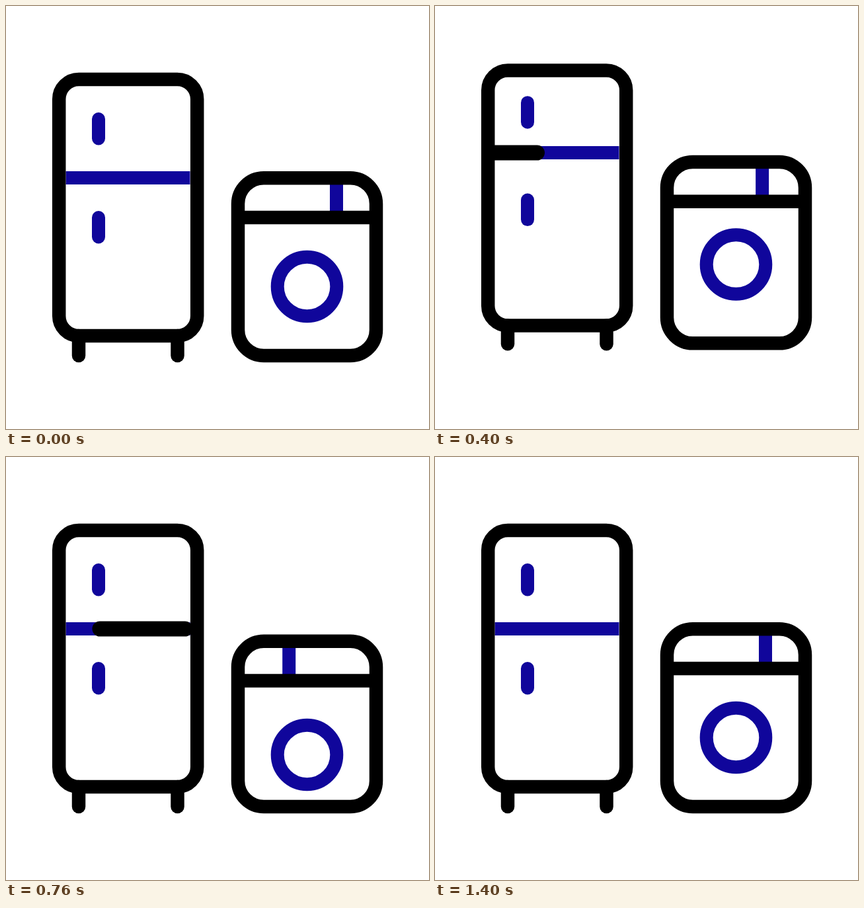
These frames come from a looping animation (640 by 640 pixels, 1.48 s). An HTML page with a canvas:

```html
<!DOCTYPE html>
<html>
<head>
<meta charset="utf-8">
<title>Appliances</title>
<style>
html, body { margin: 0; width: 100%; height: 100%; overflow: hidden; background: #fff; }
canvas { display: block; width: 100vw; height: 100vh; }
</style>
</head>
<body>
<canvas id="stage" width="640" height="640"></canvas>
<script>
const ctx = document.getElementById('stage').getContext('2d');
const LOOP = 1480, STEP = 40;
const BLACK = '#000', BLUE = '#10069b';
const RISE = 190, FALL = 285, SETTLE = 155;

// Smooth progress from 0 to 1 between two times.
function ease(t, from, to) {
  const s = Math.min(1, Math.max(0, (t - from) / (to - from)));
  return s * s * (3 - 2 * s);
}

// A hop: every part rises by lift, lands squash below its place, then settles.
function hop(t, start) {
  const apex = start + RISE, landing = apex + FALL;
  const up = ease(t, start, apex);
  const down = ease(t, apex, landing);
  const settled = ease(t, landing, landing + SETTLE);
  return (lift, squash = 0) => squash * (down - settled) - lift * (up - down);
}

function line(x0, y0, x1, y1, color, cap = 'butt', width = 20) {
  ctx.strokeStyle = color;
  ctx.lineCap = cap;
  ctx.lineWidth = width;
  ctx.beginPath();
  ctx.moveTo(x0, y0);
  ctx.lineTo(x1, y1);
  ctx.stroke();
}

function frame(left, top, right, bottom, radius) {
  ctx.strokeStyle = BLACK;
  ctx.lineWidth = 20.5;
  ctx.beginPath();
  ctx.roundRect(left, top, right - left, bottom - top, radius);
  ctx.stroke();
}

function handle(y) {
  line(140, y, 140, y + 29.5, BLUE, 'round');
}

function drawFridge(t) {
  const move = hop(t, 95);
  const top = 111 + move(39.5, 33);
  const shelf = 260 + move(66, 12.5);
  const bottom = 499 + move(28, 7.2);
  const foot = 529 + move(27.5);

  const left = 90.5, right = 278.5;
  const tail = left + (right - left) * ease(t, 440, 1370);
  const head = left + (right - left) * ease(t, 110, 850);

  line(left, shelf, right, shelf, BLUE);
  if (head > tail) line(tail, shelf, head, shelf, BLACK, 'round', 23);
  for (const x of [110, 259.5]) line(x, bottom, x, foot, BLACK, 'round', 20.5);
  frame(80.2, top, 289.2, bottom, 30);
  handle(171 + move(58, 34.8));
  handle(320 + move(56.5, 27.7));
}

// The slider speeds up to the left, bounces and slows down on its way back.
function sliderX(t) {
  const u = Math.max(0, 1 - Math.abs(t - 845) / 560);
  return 500 - 94 * (1 - Math.cos(u * Math.PI / 2));
}

function drawWasher(t) {
  const move = hop(t, 285);
  const top = 260.2 + move(37, 18.6);
  const divider = top + 59.7;
  const slider = sliderX(t);

  line(slider, top, slider, divider, BLUE);
  line(351, divider, 560, divider, BLACK, 'butt', 20.5);
  frame(351, top, 560, 529 + move(28.5), 39);
  ctx.strokeStyle = BLUE;
  ctx.lineWidth = 20;
  ctx.beginPath();
  ctx.arc(455.5, 424.5 + move(51, 26), 44.8, 0, Math.PI * 2);
  ctx.stroke();
}

function render(now) {
  const t = Math.floor((now % LOOP) / STEP) * STEP;
  ctx.fillStyle = '#fff';
  ctx.fillRect(0, 0, 640, 640);
  drawFridge(t);
  drawWasher(t);
}

const origin = performance.now();
function tick() {
  render(performance.now() - origin);
  requestAnimationFrame(tick);
}
tick();
</script>
</body>
</html>
```
